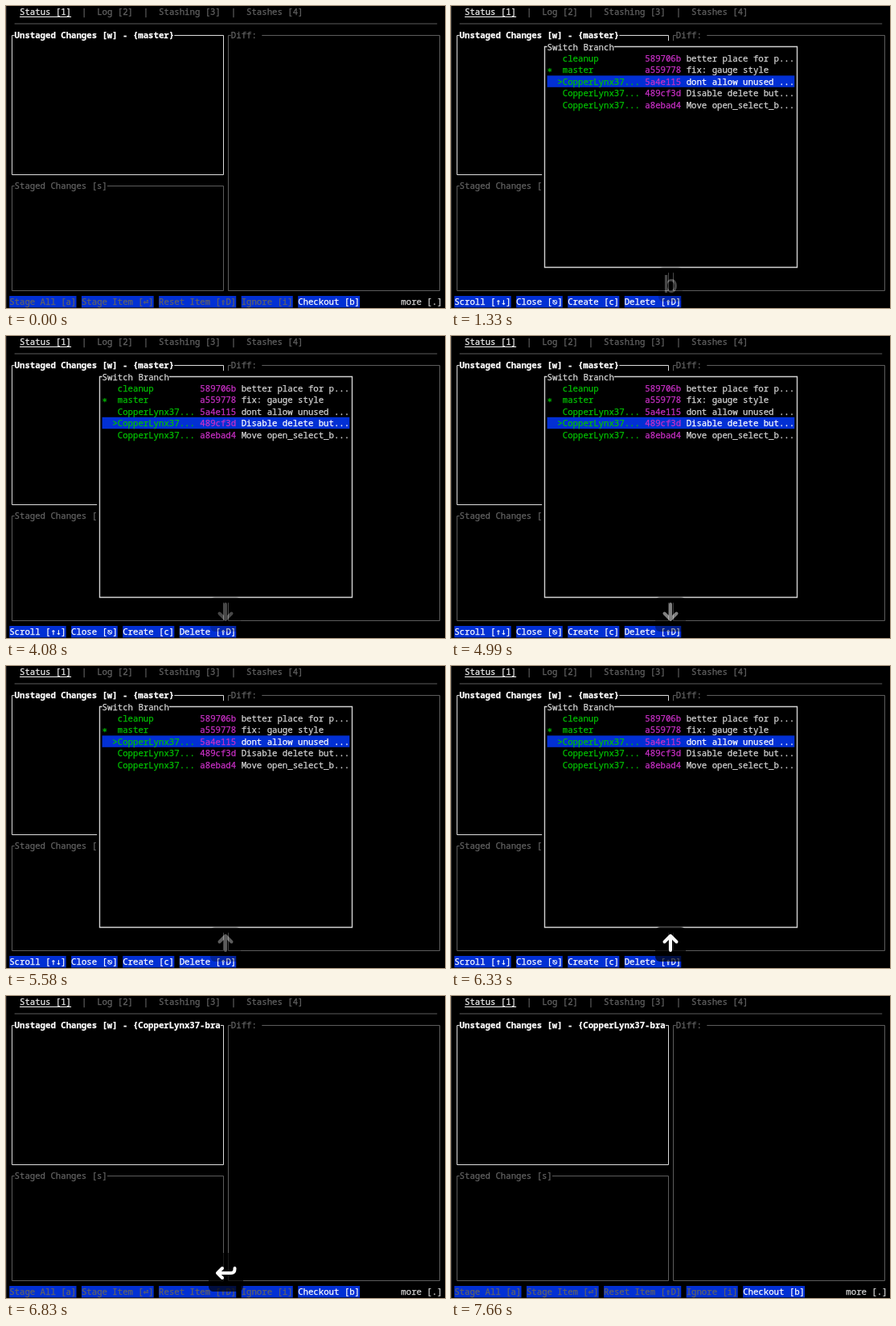
An HTML page for the animation above (8 s loop, 546 px wide and 375 px high).

```html
<!DOCTYPE html>
<html lang="en">
<head>
<meta charset="utf-8">
<title>Switch branch</title>
<style>
  html, body { margin: 0; width: 100%; height: 100%; overflow: hidden; background: #000; }
  svg { display: block; }
  .cell { font: 10.683px "Noto Sans Mono", "DejaVu Sans Mono", monospace; white-space: pre; stroke-width: 0.25px; }
  .cell.symbol { font-family: "DejaVu Sans Mono", monospace; }
  .cell.bold { font-weight: 700; }
  .key { font: 500 30px Inter, "Open Sans", sans-serif; text-anchor: middle; }
</style>
</head>
<body>
<svg id="stage" width="546" height="375" viewBox="0 0 546 375"></svg>
<script>
const LOOP = 8000;
const CW = 6.41, RH = 14.4, X0 = 4.2, Y0 = 7.6;
const DIM = '#636363', LINE = '#5c5c5c', TEXT = '#d6d6d6', WHITE = '#fff';
const BLUE = '#0230d4', GREEN = '#00c200', PINK = '#ca30c7';
const USER = 'CopperLynx37';

const colX = c => X0 + c * CW;
const midX = c => Math.floor(colX(c) + CW / 2) + 0.5;
const midY = r => Math.floor(Y0 + r * RH) + 0.5;

function add(parent, tag, attrs, text) {
  const el = document.createElementNS('http://www.w3.org/2000/svg', tag);
  for (const name in attrs) el.setAttribute(name, attrs[name]);
  if (text !== undefined) el.textContent = text;
  parent.appendChild(el);
  return el;
}

const stage = document.getElementById('stage');
const group = (parent = stage) => add(parent, 'g', {});

// Symbols get their own run so every run starts on its column.
function put(g, col, row, text, fill, bold) {
  for (const m of text.matchAll(/[ -~]+|[^ -~]/g)) {
    const kind = m[0] > '~' ? ' symbol' : bold ? ' bold' : '';
    add(g, 'text', {
      class: 'cell' + kind, x: colX(col + m.index), y: 11.4 + row * RH, fill, stroke: fill
    }, m[0]);
  }
}

function fillCells(g, col, row, cols, rows, fill) {
  add(g, 'rect', { x: colX(col), y: row * RH, width: cols * CW, height: rows * RH, fill });
}

function stroke(g, d, color, width = 1) {
  return add(g, 'path', { d, fill: 'none', stroke: color, 'stroke-width': width });
}

// Border whose top edge leaves a gap for the title.
function frame(g, c1, r1, c2, r2, titleLen, color, width) {
  const l = midX(c1), t = midY(r1), r = midX(c2), b = midY(r2);
  stroke(g, `M${colX(c1 + 1)} ${t}H${l}V${b}H${r}V${t}H${colX(c1 + 1 + titleLen)}`, color, width);
}

function buttons(g, items) {
  for (const [col, label, color] of items) {
    fillCells(g, col, 25, label.length, 1, BLUE);
    put(g, col, 25, label, color);
  }
}

// Tabs and panels
const base = group();
add(base, 'rect', { width: 546, height: 375, fill: '#000' });
add(base, 'rect', { width: 1, height: 375, fill: '#2c2c2c' });
put(base, 2, 0, 'Status [1]', '#f0f0f0');
stroke(base, `M${colX(2)} 13.5H${colX(12)}`, '#f0f0f0');
[[17, 'Log [2]'], [29, 'Stashing [3]'], [46, 'Stashes [4]']].forEach(([c, s]) => {
  put(base, c - 3, 0, '|', DIM);
  put(base, c, 0, s, DIM);
});
stroke(base, `M${colX(1)} ${Y0 + RH}H${colX(83)}`, LINE);
frame(base, 0, 15, 41, 24, 18, LINE);
put(base, 1, 15, 'Staged Changes [s]', DIM);
frame(base, 42, 2, 83, 24, 6, LINE);
put(base, 43, 2, 'Diff:', DIM);

function unstaged(branch) {
  const g = group();
  const title = ('Unstaged Changes [w] - {' + branch + '}').slice(0, 40);
  frame(g, 0, 2, 41, 14, title.length, '#dcdcdc');
  put(g, 1, 2, title, WHITE, true);
  return g;
}
const before = unstaged('master');
const after = unstaged(USER + '-branch');

const mainBar = group();
buttons(mainBar, [
  [0, 'Stage All [a]', DIM], [14, 'Stage Item [⏎]', DIM], [29, 'Reset Item [⇧D]', DIM],
  [45, 'Ignore [i]', DIM], [56, 'Checkout [b]', WHITE]
]);
put(mainBar, 76, 25, 'more [.]', TEXT);

// Branch list
const popup = group();
fillCells(popup, 17, 3, 50, 20, '#000');
frame(popup, 17, 3, 66, 22, 13, '#d2d2d2', 1.4);
put(popup, 18, 3, 'Switch Branch', TEXT);
buttons(popup, [
  [0, 'Scroll [↑↓]', WHITE], [12, 'Close [⎋]', WHITE],
  [22, 'Create [c]', WHITE], [33, 'Delete [⇧D]', WHITE]
]);

const branches = [
  ['cleanup', '589706b', 'better place for p...'],
  ['master', 'a559778', 'fix: gauge style'],
  [USER + '...', '5a4e115', 'dont allow unused ...'],
  [USER + '...', '489cf3d', 'Disable delete but...'],
  [USER + '...', 'a8ebad4', 'Move open_select_b...']
];

function branchRows(selected) {
  const g = group(popup);
  branches.forEach(([name, hash, message], i) => {
    const row = 4 + i, on = i === selected;
    if (on) {
      fillCells(g, 18, row, 48, 1, BLUE);
      put(g, 20, row, '>', GREEN);
    }
    if (name === 'master') put(g, 18, row, '∗', GREEN);
    put(g, 21, row, name, GREEN);
    put(g, 37, row, hash, PINK);
    put(g, 45, row, message, on ? WHITE : TEXT);
  });
  return g;
}
const lists = { 2: branchRows(2), 3: branchRows(3) };

// Pressed keys
function keycap(x1, y1, x2) {
  const g = group();
  add(g, 'rect', { x: x1, y: y1, width: x2 - x1, height: 367 - y1, rx: 6, fill: '#000', 'fill-opacity': 0.7 });
  return g;
}
function glyph(g, d) {
  const p = stroke(g, d, WHITE, 4);
  p.setAttribute('stroke-linecap', 'round');
  p.setAttribute('stroke-linejoin', 'round');
  return p;
}
const keyB = keycap(258, 324, 288);
add(keyB, 'text', { class: 'key', x: 273, y: 355.5, fill: WHITE }, 'b');
const keyDown = keycap(254, 324, 292);
glyph(keyDown, 'M273 333V351M265.5 344.5L273 352L280.5 344.5');
const keyUp = keycap(254, 324, 292);
const upArrow = glyph(keyUp, 'M273 353V335M265.5 342.5L273 335L280.5 342.5');
const keyEnter = keycap(252, 319, 295);
glyph(keyEnter, 'M269 338L263 344L269 350M264 344H280Q284.5 344 284.5 339V338');

// [start ms, value] steps
const scenes = [[0, 0], [1330, 2], [4080, 3], [5490, 2], [6750, 0]];
const fades = [
  [keyB, [[1330, .28], [1410, .55], [1490, .8], [1580, 1], [2160, .6], [2240, .25], [2330, 0]]],
  [keyDown, [[4080, .28], [4160, .55], [4250, .8], [4330, 1], [4910, .75], [4990, .5], [5080, .25], [5160, 0]]],
  [keyUp, [[5490, .12], [5580, .36], [5660, .7], [5740, 1], [6330, .98], [6490, .95], [6660, .92], [6750, .45], [6830, 0]]],
  [keyEnter, [[6580, .12], [6660, .36], [6750, .7], [6830, 1], [7410, .75], [7490, .5], [7580, .25], [7660, 0]]]
];
const upShift = [[0, '0 0'], [6580, '1.5 -5'], [6660, '3 -10']];

function at(steps, t, first = 0) {
  let value = first;
  for (const [start, v] of steps) if (t >= start) value = v;
  return value;
}
const show = (el, on) => el.setAttribute('visibility', on ? 'inherit' : 'hidden');

function draw(t) {
  const selected = at(scenes, t), done = t >= 6750;
  show(before, !done);
  show(after, done);
  show(mainBar, !selected);
  show(popup, selected);
  for (const i in lists) show(lists[i], +i === selected);
  for (const [key, steps] of fades) key.setAttribute('opacity', at(steps, t));
  upArrow.setAttribute('transform', `translate(${at(upShift, t)})`);
}

function tick() {
  draw(performance.now() % LOOP);
  requestAnimationFrame(tick);
}
tick();
</script>
</body>
</html>
```
